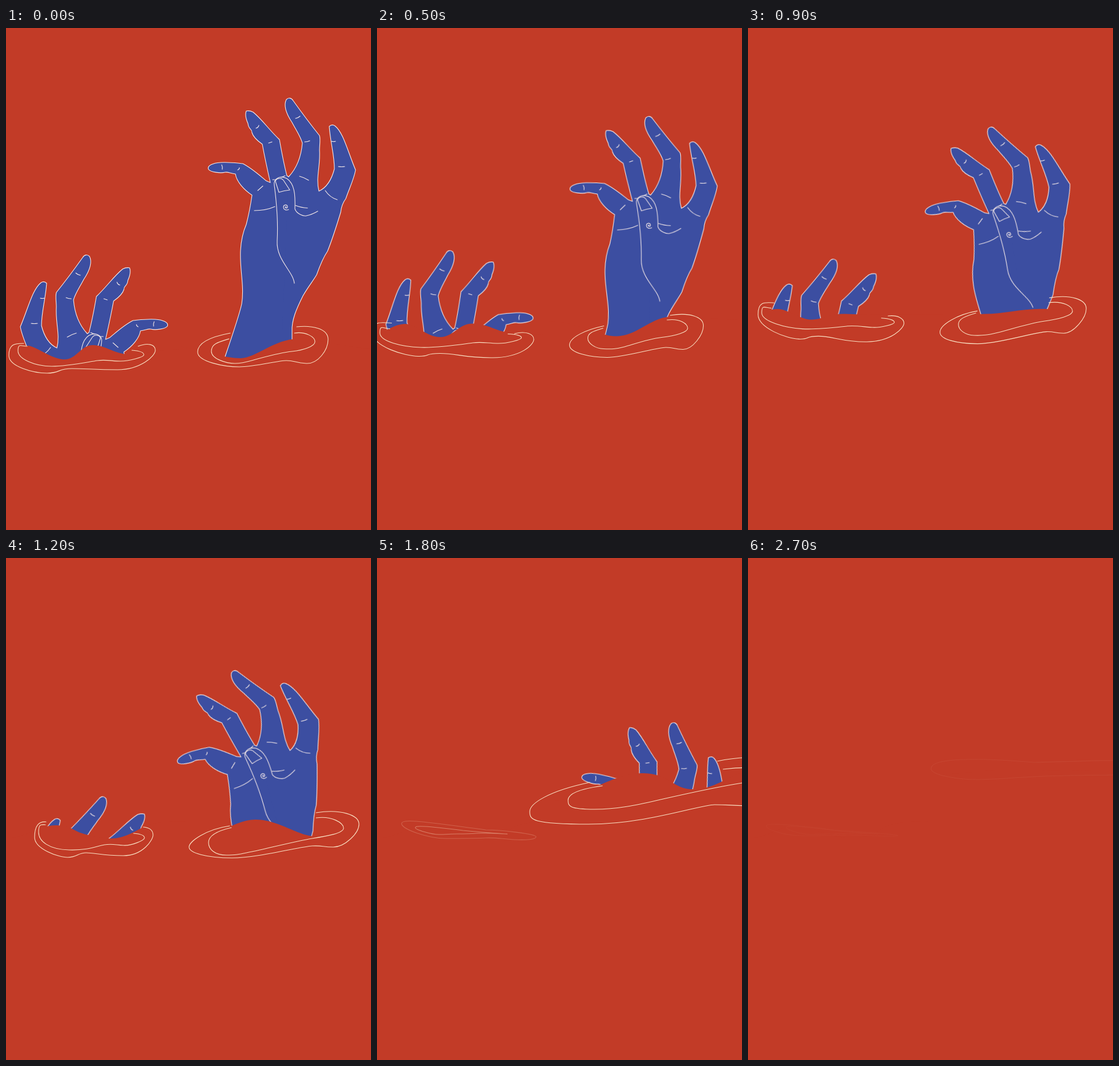
An HTML page without scripts that plays this animation: 638 px wide and 877 px high, repeating every 2800 ms.

```html
<!DOCTYPE html>
<html lang="en">
<head>
<meta charset="utf-8">
<title>Sinking hands</title>
<style>
html, body { margin: 0; width: 100%; height: 100%; overflow: hidden; background: #c23b27; }
svg { display: block; width: 638px; height: 877px; }

/* Poses --a to --g fall at 0, 300, 700, 1200, 1500, 1800 and 2700 ms, drawn in 100 ms steps. */
@keyframes morph {
  0% { d: var(--a); animation-timing-function: steps(3); }
  10.714% { d: var(--b); animation-timing-function: steps(4); }
  25% { d: var(--c); animation-timing-function: steps(5); }
  42.857% { d: var(--d); animation-timing-function: steps(3); }
  53.571% { d: var(--e); animation-timing-function: steps(3); }
  64.285%, 67.857% { d: var(--f); animation-timing-function: steps(8); }
  96.428%, 100% { d: var(--g); }
}
@keyframes sink {
  0% { transform: var(--a); animation-timing-function: steps(3); }
  10.714% { transform: var(--b); animation-timing-function: steps(4); }
  25% { transform: var(--c); animation-timing-function: steps(5); }
  42.857% { transform: var(--d); animation-timing-function: steps(3); }
  53.571% { transform: var(--e); animation-timing-function: steps(3); }
  64.285%, 67.857% { transform: var(--f); animation-timing-function: steps(8); }
  96.428%, 100% { transform: var(--g); }
}
@keyframes fade {
  0%, 42.857% { opacity: 1; animation-timing-function: steps(3); }
  53.571% { opacity: var(--o1); animation-timing-function: steps(3); }
  64.285%, 67.857% { opacity: var(--o2); animation-timing-function: steps(4); }
  82.142% { opacity: var(--o3); animation-timing-function: steps(4); }
  96.428%, 100% { opacity: var(--o4); }
}

.skin { fill: #3c4ea1; }
.hand { fill: none; stroke: #f8ecea; stroke-width: 1.1; stroke-linecap: round; stroke-linejoin: round;
  transform-origin: 489px 313px; animation: sink 2.8s infinite; }
.water { fill: #c23b27; animation: morph 2.8s infinite; }
.ring { fill: none; stroke: #fbe3c6; stroke-width: 1.1; stroke-linecap: round;
  animation: morph 2.8s infinite, fade 2.8s infinite; }

.hand.right {
  --a: translate(0px, 0px) rotate(0deg);
  --b: translate(0px, 29px) rotate(4deg);
  --c: translate(-28px, 35px) rotate(-7.8deg);
  --d: translate(-39.5px, 67.5px) rotate(-17.5deg);
  --e: translate(-27px, 110px) rotate(-8.4deg);
  --f: translate(-10px, 161px) rotate(10.4deg);
  --g: translate(16px, 335px) rotate(22deg);
}
.hand.left {
  --a: translate(0px, 0px) rotate(0deg);
  --b: translate(10px, -15px) rotate(3.6deg);
  --c: translate(5px, -1px) rotate(0deg);
  --d: translate(-8px, 20px) rotate(-6.3deg);
  --e: translate(-20px, 110px) rotate(-10deg);
  --f: var(--e);
  --g: var(--e);
}

.water.right {
  --a: path("M300 877V555C350 565 384 577 410 577S470 543 510 543S600 560 638 560V877");
  --b: path("M300 877V505C350 505 395 549 438 549S500 520 530 515S600 515 638 515V877");
  --c: path("M300 877V520C350 520 375 528 400 528S455 494 492 494S600 505 638 505V877");
  --d: path("M300 877V500C350 500 395 457 436 457S510 486 540 486S600 480 638 480V877");
  --e: path("M300 877V412C330 412 360 412 385 413S455 444 492 444S600 405 638 405V877");
  --f: path("M300 877V425C350 425 410 376 462 376S515 404 553 404S615 380 638 375V877");
  --g: path("M300 877V380C350 380 410 370 462 370S515 372 553 372S615 370 638 370V877");
}
.water.left {
  --a: path("M0 877V558C15 555 25 555 38 555S80 579 102 579S130 554 152 554S190 570 215 570S270 560 340 560V877");
  --b: path("M0 877V570C10 560 40 527 68 527S105 551 128 551S160 527 182 527S205 533 220 538S270 545 340 545V877");
  --c: path("M0 877V505C10 505 20 507 30 507S70 529 93 529S125 506 150 506S200 518 215 521S270 528 340 528V877");
  --d: path("M0 877V490C30 490 60 467 86 467S118 476 130 480S165 490 185 490S225 478 240 470S275 460 340 460V877");
  --e: var(--d);
  --f: var(--d);
  --g: var(--d);
}

.outer.right {
  --o1: 1; --o2: 1; --o3: .55; --o4: 0;
  --a: path("M508 522C535 519 563 525 563 544S545 587 525 586S505 581 490 581S435 592 408 592S335 583 335 566S360 539 392 533");
  --b: path("M508 515C540 510 567 517 567 533S548 571 532 571S515 567 498 567S430 581 400 581S327 572 327 559S355 536 386 529");
  --c: path("M517 489C550 483 574 491 574 507S555 552 538 552S528 549 512 549S435 570 405 570S346 563 346 549S375 518 407 512");
  --d: path("M542 445C585 438 617 449 617 465S592 505 572 505S555 502 535 503S440 524 395 524S320 515 320 505S350 474 391 468");
  --e: path("M563 391C605 385 652 398 652 420S615 463 590 463S570 459 550 459S450 476 415 476S313 464 313 448S350 418 398 409");
  --f: path("M595 355C660 340 760 350 760 385S690 434 650 433S615 431 590 431S470 465 370 465S267 457 267 443S300 407 372 392");
  --g: path("M500 350C560 350 860 340 860 368S700 388 650 389S615 390 590 390S450 400 370 400S250 388 250 372S330 342 500 350");
}
.inner.right {
  --o1: 1; --o2: 1; --o3: .9; --o4: .06;
  --a: path("M504 533C525 530 540 540 540 548S520 563 500 565S455 574 440 578S415 586 400 586S359 578 359 565S370 549 390 543");
  --b: path("M499 523C522 520 534 532 534 539S515 551 490 554S440 565 425 569S405 572 390 572S360 563 360 552S370 538 389 533");
  --c: path("M515 497C540 494 552 503 552 510S530 524 505 527S455 541 440 545S415 550 402 549S377 540 377 532S385 522 401 516");
  --d: path("M542 454C570 450 590 463 590 472S560 486 535 490S450 509 430 513S405 519 385 519S354 509 354 497S368 477 394 471");
  --e: path("M562 409C595 407 615 420 615 428S580 442 545 445S470 460 450 464S425 471 395 471S354 460 354 446S368 428 398 422");
  --f: path("M605 369C650 363 710 367 710 378S670 388 638 393S540 412 500 421S425 439 380 439S334 433 334 423S350 404 394 398");
  --g: path("M500 357C560 356 800 345 800 365S720 378 638 379S540 380 500 382S430 387 400 387S320 380 320 368S350 345 500 357");
}
.outer.left {
  --o1: .5; --o2: .23; --o3: .12; --o4: .03;
  --a: path("M231 556C248 549 261 553 261 563S235 597 195 597S140 595 115 595S95 603 72 603S5 592 5 572S15 551 31 551");
  --b: path("M233 543C252 537 265 541 265 551S245 585 195 585S135 583 108 583S92 590 68 590S-10 578 -10 557S5 538 22 538");
  --c: path("M248 525C268 521 283 528 283 537S258 566 210 567S145 554 112 554S100 558 76 557S-4 535 -4 509S12 492 29 493");
  --d: path("M240 470C251 471 257 476 257 484S240 520 205 520S155 515 140 515S125 523 108 523S50 508 50 488S57 460 70 461");
  --e: path("M175 465C205 463 253 470 253 482S235 504 208 503S165 495 152 495S140 498 130 497S92 490 92 472S115 451 175 465");
  --f: path("M190 475C215 475 278 482 278 487S260 493 240 492S205 488 190 489S150 490 120 490S43 474 43 464S90 462 190 475");
  --g: path("M150 475C190 478 240 481 258 484S230 486 215 485S190 484 175 484S120 486 90 485S32 474 32 468S80 466 150 475");
}
.inner.left {
  --o1: .85; --o2: .4; --o3: .2; --o4: .03;
  --a: path("M220 563C234 564 241 567 241 571S215 582 200 582S175 579 160 581S110 591 80 591S21 578 21 564S26 556 37 556");
  --b: path("M218 545C232 545 240 547 240 551S215 565 195 565S175 563 160 566S110 580 68 580S8 570 8 555S12 546 24 546");
  --c: path("M240 524C255 525 265 528 265 531S240 538 225 537S190 533 175 534S110 538 85 536S2 525 2 510S8 504 21 505");
  --d: path("M223 481C236 482 242 485 242 489S220 503 205 502S185 499 172 501S145 511 110 510S57 495 57 479S62 466 69 466");
  --e: path("M175 474C200 474 229 482 229 487S218 493 206 492S190 488 180 488S150 490 130 489S102 478 102 465S120 458 175 474");
  --f: path("M150 476C180 479 210 481 225 482S190 480 175 481S150 482 140 482S120 483 108 483S67 475 67 471S85 468 150 476");
  --g: var(--f);
}
</style>
</head>
<body>
<svg viewBox="0 0 638 877">
  <defs>
    <g id="hand">
      <!-- the two halves overlap along the palm -->
      <path class="skin" d="M500 600L375 600L384 571C396 536 408 500 412 482C417 450 408 420 410 388C411 370 414 357 420 343Q426 320 430 292C415 282 403 268 401 255C392 254 388 251 383 252C375 254 358 252 354 247C351 240 362 236 375 235C390 234 403 236 414 237C430 245 445 259 455 267L462 270C457 248 452 225 448 203C438 196 432 190 430 183C430 175 424 178 423 167C419 158 418 150 420 145C424 144 428 145 432 147C447 159 460 178 478 195C482 218 487 243 491 258L494 260"/>
      <path class="skin" d="M494 260C508 245 516 225 518 201C515 190 508 180 500 165C490 150 485 135 490 125C494 121 499 122 502 127C517 148 532 168 548 188C550 195 548 205 548 213C550 240 541 262 547 285C562 278 570 262 574 246C574 222 567 200 565 172C568 169 572 169 575 171C590 183 597 215 611 248C608 265 600 280 594 298C588 306 586 312 585 322C578 345 568 375 562 390C553 403 548 417 543 431C536 443 528 452 519 468C508 490 499 510 500 530V600H480"/>
      <!-- thumb, nail and spiral -->
      <path d="M504 446C502 425 472 405 474 372C476 335 473 305 469 275C467 262 480 257 491 263C504 272 506 290 505 316C508 325 520 329 525 328Q535 326 545 320"/>
      <path d="M477 287L471 268C472 262 481 261 485 266L496 283Q486 284 477 287Z"/>
      <path d="M490 313c0-1-2-1-2 0c0 2 4 3 4-1c0-4-7-4-7 1c0 5 6 6 9 4"/>
      <!-- creases -->
      <path d="M377 239q2 4 1 8M408 244q0 3-3 4M440 284l9-8M437 175q4-1 5-5M459 201l6-2M506 158q5-1 8-4M522 199q5 0 9-2M569 198q4 1 7 0M581 242q6 1 11 0"/>
      <path d="M513 259q8 2 16 7M558 284q8 12 21 16M481 261l7-3M466 265h4M434 319q20 0 36-7M506 310q10 4 21 4.500"/>
    </g>
  </defs>

  <g class="hand right"><use href="#hand"/></g>
  <g transform="matrix(-1 0 0 1 636 274)">
    <g class="hand left"><use href="#hand"/></g>
  </g>

  <path class="water right"/>
  <path class="water left"/>

  <path class="ring outer right"/>
  <path class="ring inner right"/>
  <path class="ring outer left"/>
  <path class="ring inner left"/>
</svg>
</body>
</html>
```
